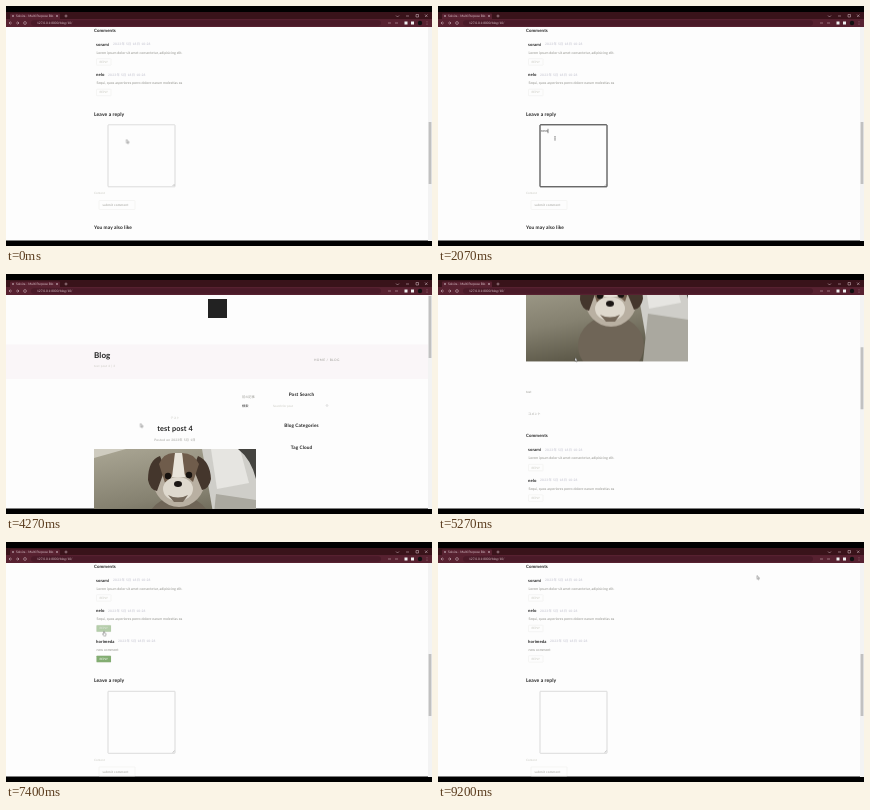
Animation of 426x240 px, one loop 9270 ms. Source, as an HTML page:

```html
<!DOCTYPE html>
<html lang="en">
<head>
<meta charset="utf-8">
<title>Blog comments</title>
<style>
  :root { --loop: 9270ms; }
  html, body { margin: 0; width: 100%; height: 100%; overflow: hidden; background: #000; }
  svg {
    display: block; width: 100vw; height: 100vh;
    font-family: Lato, "Noto Sans CJK JP", sans-serif; text-rendering: geometricPrecision;
  }
  .head { font-weight: 700; fill: #222; letter-spacing: .1px; }
  .small { font-size: 3.2px; fill: #9a9a94; }
  .copy { font-size: 3.55px; fill: #92928c; }
  .pale { font-size: 3px; fill: #c8c8c0; }
  .date { font-size: 3.2px; fill: #bcbcca; letter-spacing: .25px; }
  .mid { text-anchor: middle; }
  .outline { fill: #fdfdfd; stroke: #ececе6; stroke: #ececea; stroke-width: .5; }
  .chrome { fill: #d9c3ca; font-size: 3.2px; }
  .lines { fill: none; stroke: #d9c3ca; stroke-width: .5; }

  .scroll { animation: scroll var(--loop) infinite; }
  .thumb { animation: thumb var(--loop) infinite; }
  .posted { animation: posted var(--loop) step-end infinite; }
  .lower { animation: lower var(--loop) step-end infinite; }
  .focus { animation: focus var(--loop) step-end infinite; }
  .mouse { animation: mouse var(--loop) infinite; }
  .arrow { animation: arrow var(--loop) step-end infinite; }
  .beam { animation: beam var(--loop) step-end infinite; }
  .hand { animation: hand var(--loop) step-end infinite; }
  .hover { opacity: 0; animation: hover var(--loop) linear infinite; }

  @keyframes scroll {
    0%, 41.75% { transform: translateY(-318px); animation-timing-function: step-end; }
    41.76%, 50.7% { transform: translateY(0); }
    53.5%, 55% { transform: translateY(-95px); }
    58%, 59.5% { transform: translateY(-190px); }
    63%, 70.7% { transform: translateY(-275px); }
    73.9%, 100% { transform: translateY(-318px); }
  }
  @keyframes thumb {
    0%, 41.75% { transform: translateY(94px); animation-timing-function: step-end; }
    41.76%, 50.7% { transform: translateY(0); }
    53.5%, 55% { transform: translateY(27px); }
    58%, 59.5% { transform: translateY(54px); }
    63%, 70.7% { transform: translateY(78px); }
    73.9%, 100% { transform: translateY(90px); }
  }
  @keyframes posted { 0% { opacity: 0; } 41.76%, 100% { opacity: 1; } }
  @keyframes lower { 0% { transform: none; } 41.76%, 100% { transform: translateY(30.5px); } }
  @keyframes focus { 0% { opacity: 0; } 8.6% { opacity: 1; } 40.2%, 100% { opacity: 0; } }
  @keyframes hover { 0% { opacity: 0; } 2%, 5% { opacity: 1; } 7%, 100% { opacity: 0; } }
  @keyframes mouse {
    0%, 2% { transform: translate(120.5px, 133.5px); }
    6%, 33% { transform: translate(117px, 131.5px); }
    37%, 41.8% { transform: translate(110px, 198px); }
    45.5%, 51% { transform: translate(134.5px, 149.5px); }
    62%, 70.5% { transform: translate(137.5px, 70.5px); }
    74.5%, 77.5% { transform: translate(98px, 117px); }
    79.3%, 82% { transform: translate(98px, 89.5px); }
    84.5%, 87% { transform: translate(98px, 56px); }
    95%, 100% { transform: translate(319px, 33.5px); }
  }
  @keyframes arrow {
    0% { opacity: 1; } 5% { opacity: 0; } 42% { opacity: 1; }
    74% { opacity: 0; } 88%, 100% { opacity: 1; }
  }
  @keyframes beam { 0% { opacity: 0; } 5% { opacity: 1; } 36%, 100% { opacity: 0; } }
  @keyframes hand {
    0% { opacity: 0; } 36% { opacity: 1; } 42% { opacity: 0; }
    74% { opacity: 1; } 88%, 100% { opacity: 0; }
  }
</style>
</head>
<body>
<svg viewBox="0 0 426 240" preserveAspectRatio="none">
  <defs>
    <clipPath id="view"><rect y="21" width="426" height="213.5"/></clipPath>
    <clipPath id="photo"><rect x="88" y="175.5" width="162" height="92"/></clipPath>
    <linearGradient id="room" x2=".3" y2="1">
      <stop offset="0" stop-color="#aaa694"/>
      <stop offset=".6" stop-color="#858170"/>
      <stop offset="1" stop-color="#5c5848"/>
    </linearGradient>
  </defs>
  <rect width="426" height="240"/>

  <!-- browser frame -->
  <rect y="6" width="426" height="8" fill="#39131a"/>
  <path d="M4 14V8.500q0-1 1-1H53q1 0 1 1V14z" fill="#572130"/>
  <rect y="13" width="426" height="8" fill="#572130"/>
  <rect x="25" y="14.300" width="350" height="5.400" rx="2.700" fill="#4a1a28"/>
  <circle cx="7" cy="10" r="1" fill="#a88b94"/>
  <text class="chrome" x="10" y="11">Solvira - Multi Purpose Blo</text>
  <text class="chrome" x="31" y="18.200">127.0.0.1:8000/blog/10/</text>
  <path class="lines" d="M50 9l2 2m0-2l-2 2M58.500 10h3m-1.500-1.500v3M6 17H3m1.500-1.500L3 17l1.500 1.500M10 17h3m-1.500-1.500L13 17l-1.500 1.500M390 9.500l1.500 1.500 1.500-1.500M400 10h3M410 8.500h2.500V11H410zM419 8.500l2.500 2.500m0-2.500L419 11M382 17h3m4 0h3M421 15.500v.6m0 .7v.6m0 .7v.6"/>
  <circle class="lines" cx="19" cy="17" r="1.400"/>
  <rect x="398.500" y="15.500" width="3" height="3" fill="#eee"/>
  <rect x="405" y="15.500" width="3" height="3" fill="#eee"/>
  <circle cx="414" cy="17" r="2.200" fill="#111"/>

  <g clip-path="url(#view)">
    <rect y="21" width="426" height="214" fill="#fdfdfd"/>
    <g class="scroll">
      <rect x="202" y="25" width="19" height="19" fill="#222"/>
      <rect y="70.500" width="422" height="34.500" fill="#faf6f8"/>
      <text class="head" x="88" y="84" font-size="8">Blog</text>
      <text class="pale" x="88" y="93" letter-spacing=".2">test post 4 | 3</text>
      <text class="small" x="308" y="87" letter-spacing=".4">HOME / BLOG</text>
      <text class="small" x="236" y="123.500">前の記事</text>
      <text x="236" y="132.500" font-size="3.200" fill="#333">検索</text>
      <text class="head mid" x="295.500" y="121.500" font-size="4.700">Post Search</text>
      <text class="pale" x="267" y="133">Search for post</text>
      <circle cx="321" cy="131.500" r=".9" fill="none" stroke="#bbb" stroke-width=".4"/>
      <text class="head mid" x="295.500" y="153" font-size="4.700">Blog Categories</text>
      <text class="head mid" x="295.500" y="174.500" font-size="4.700">Tag Cloud</text>
      <text class="pale mid" x="169" y="144.500">テスト</text>
      <text class="head mid" x="169" y="156.500" font-size="7.300">test post 4</text>
      <text class="small mid" x="169" y="166.500" letter-spacing=".2">Posted on 2023年 5月 1日</text>

      <g clip-path="url(#photo)">
        <rect x="88" y="175" width="162" height="93" fill="url(#room)"/>
        <path d="M88 175h32l-32 9z" fill="#cfccc0"/>
        <path d="M196 175h54v93h-38z" fill="#cfcec9"/>
        <path d="M205 175h29l9 34-32 6z" fill="#e6e5e1"/>
        <path d="M232 175h18v30q-5-20-18-30z" fill="#454440"/>
        <path d="M210 220l40 6v42h-45z" fill="#aaa89f"/>
        <ellipse cx="173" cy="252" rx="33" ry="30" fill="#6f6557"/>
        <ellipse cx="173" cy="206" rx="26" ry="27" fill="#b9b0a2"/>
        <path d="M154 182q-12 4-12 24 2 10 9 11l8-22zM192 182q12 5 13 23-2 10-9 11l-9-22z" fill="#44362c"/>
        <path d="M153 190q5-12 16-11l-1 21-9 9zM176 179q12 0 17 11l-6 18-9-8z" fill="#6f5c4b"/>
        <path d="M169 179h7l3 24h-13z" fill="#e9e4da"/>
        <ellipse cx="172" cy="215" rx="15" ry="12" fill="#dfd9ce"/>
        <circle cx="162" cy="202" r="3.200" fill="#17120f"/>
        <circle cx="183" cy="201" r="3.200" fill="#17120f"/>
        <ellipse cx="172" cy="210" rx="4" ry="3" fill="#1c1715"/>
        <path d="M162 221q10 5 20 0l-5 7h-9z" fill="#75685a"/>
      </g>

      <text class="small" x="88" y="299">test</text>
      <text class="small" x="90" y="321.500">コメント</text>
      <text class="head" x="88" y="343.700" font-size="4.400">Comments</text>
      <g id="comments"></g>

      <g class="lower">
        <text class="head" x="88" y="427.500" font-size="5">Leave a reply</text>
        <rect x="102" y="436.800" width="67" height="62" rx=".5" fill="#fdfdfd" stroke="#c4c4c4" stroke-width=".6"/>
        <path d="M166.500 498l2-2m-.8 2l.8-.8" stroke="#888" stroke-width=".4"/>
        <g class="focus">
          <rect x="102" y="436.800" width="67" height="62" rx=".5" fill="none" stroke="#222" stroke-width=".9"/>
          <text id="typed" x="102.800" y="444.300" font-size="3.800" fill="#555"></text>
          <path id="caret" d="M102.700 440.800v4.400" stroke="#111" stroke-width=".5"/>
        </g>
        <text class="pale" x="88" y="506">Content</text>
        <rect class="outline" x="93" y="512.500" width="36" height="9" rx=".5"/>
        <text class="small mid" x="109.500" y="518.200" letter-spacing=".2">submit comment</text>
        <g class="hover" style="animation-delay:3400ms">
          <rect x="93" y="512.500" width="36" height="9" rx=".5" fill="#83ad72"/>
          <text class="mid" x="109.500" y="518.200" font-size="3.200" letter-spacing=".2" fill="#fff">submit comment</text>
        </g>
        <text class="head" x="88" y="540.500" font-size="4.800">You may also like</text>
      </g>
    </g>
    <rect x="422" y="21" width="4" height="214" fill="#f3f3f3"/>
    <rect class="thumb" x="422.600" y="22" width="2.800" height="62" fill="#c1c1c1"/>
  </g>

  <g class="mouse" stroke-width=".35" stroke-linejoin="round">
    <path class="arrow" d="M0 0v3.600l.9-.8.6 1.400.6-.3-.6-1.300h1.100z" fill="#fff" stroke="#333"/>
    <path class="beam" d="M-.8-1.600h1.600M0-1.600v3.600M-.8 2h1.600" fill="none" stroke="#444" stroke-width=".5"/>
    <path class="hand" d="M-.4 0q.4-.6.8 0v1.500l1.700.5-.3 2.400H-.3l-1.200-2 .5-.4.6.5z" fill="#fff" stroke="#333"/>
  </g>
</svg>
<script>
  const LOOP = 9270, TYPE_START = 1500, KEY_TIME = 115;
  const message = "new comment";
  const comments = [
    { name: "sorami", dateX: 107, text: "Lorem ipsum dolor sit amet consectetur, adipisicing elit.", hoverAt: 7800 },
    { name: "nelo", dateX: 102, text: "Sequi, quos asperiores porro dolore earum molestias ea", hoverAt: 7290 },
    { name: "horimeda", dateX: 112, text: message, hoverAt: 6950 }
  ];

  document.getElementById("comments").innerHTML = comments.map((c, i) => `
    <g transform="translate(0 ${i * 30.5})"><g class="${i === 2 ? "posted" : ""}">
      <text class="head" x="90" y="357.500" font-size="4.200">${c.name}</text>
      <text class="date" x="${c.dateX}" y="357.300">2023年 5月 18日 10:28</text>
      <text class="copy" x="90.500" y="365.700">${c.text}</text>
      <rect class="outline" x="90.500" y="370.700" width="14.500" height="6.500" rx=".5"/>
      <text class="pale mid" x="97.700" y="374.900">REPLY</text>
      <g class="hover" style="animation-delay:${c.hoverAt}ms">
        <rect x="90.500" y="370.700" width="14.500" height="6.500" rx=".5" fill="#83ad72"/>
        <text class="mid" x="97.700" y="374.900" font-size="3" fill="#fff">REPLY</text>
      </g>
    </g></g>`).join("");

  const typed = document.getElementById("typed");
  const caret = document.getElementById("caret");
  let start;

  function type(now) {
    start ??= now;
    const t = (now - start) % LOOP;
    const count = Math.max(0, Math.min(message.length, Math.floor((t - TYPE_START) / KEY_TIME)));
    typed.textContent = message.slice(0, count);
    const width = count ? typed.getComputedTextLength() : 0;
    caret.setAttribute("transform", `translate(${width + .2} 0)`);
    const typing = t > TYPE_START && count < message.length;
    caret.style.opacity = typing || (t - 800) % 1000 < 500 ? 1 : 0;
    requestAnimationFrame(type);
  }
  requestAnimationFrame(type);
</script>
</body>
</html>
```
